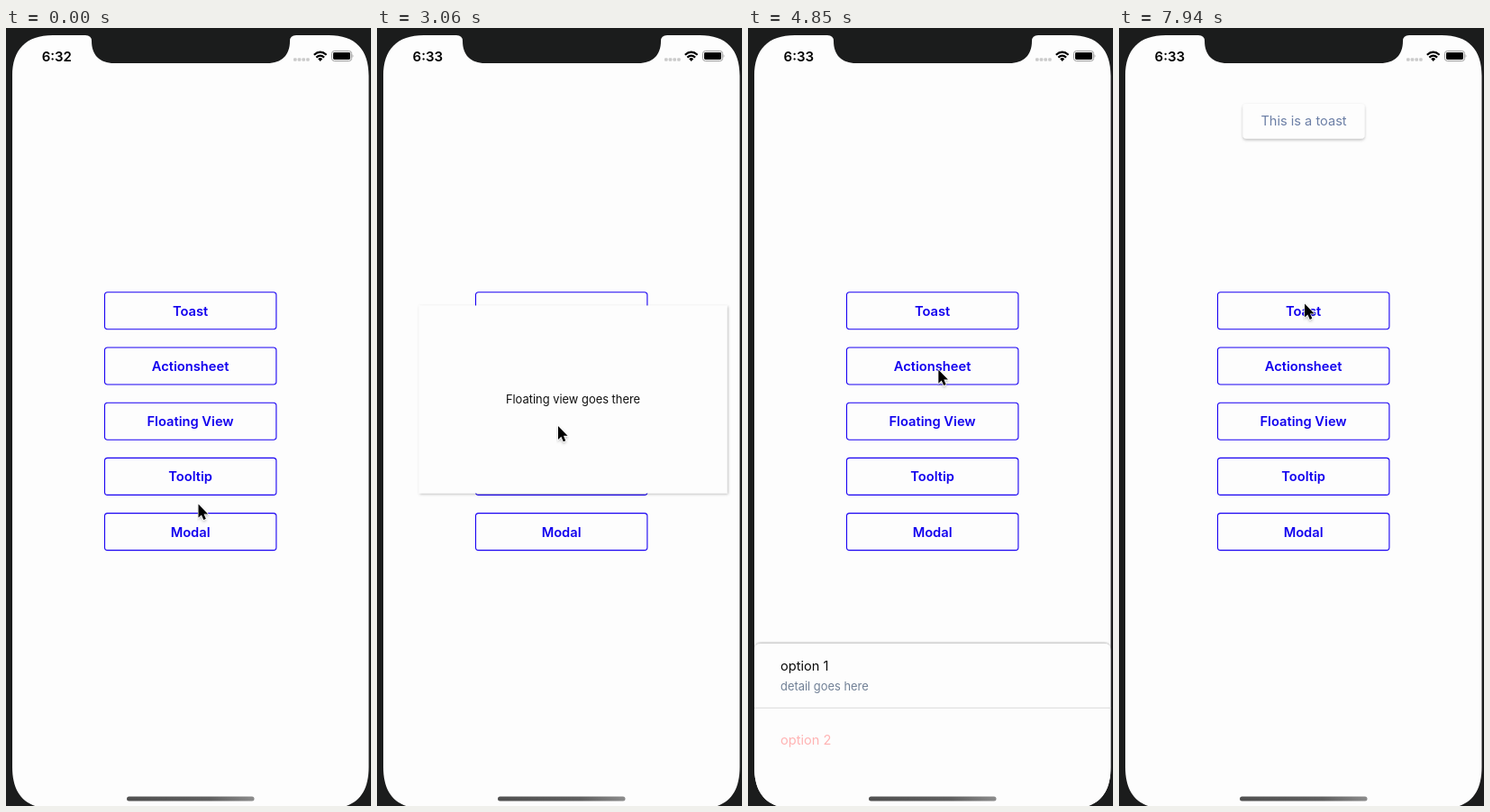
These frames come from a looping animation (405 by 862 pixels, 8 s). An HTML page:

```html
<!DOCTYPE html>
<html lang="en">
<head>
<meta charset="utf-8">
<title>Overlay demo</title>
<style>
  html, body { margin: 0; width: 100%; height: 100%; overflow: hidden; background: #1b1c1c; }
  svg { display: block; width: 100vw; height: 100vh; font-family: Inter, "Open Sans", sans-serif; }
  .btn rect { fill: none; stroke: #1800f2; stroke-width: 1.1; }
  .btn text { fill: #1200ee; font-size: 14.7px; font-weight: 600; }
  .mid { text-anchor: middle; }
  .small { font-size: 12.9px; }
  .body { font-size: 14.6px; }
</style>
</head>
<body>
<svg viewBox="0 0 405 862" xmlns="http://www.w3.org/2000/svg">
  <defs>
    <clipPath id="screen">
      <path id="shape" d="M52 8H88Q95 8 95 14.5C95 30 104 39 120 39H290C306 39 315 30 315 14.5Q315 8 322 8H358C388 8 402.5 24 402.5 53V819C402.5 849 388 865 358 865H52C22 865 7 849 7 819V53C7 24 22 8 52 8Z"/>
    </clipPath>
    <linearGradient id="bar">
      <stop offset="0" stop-color="#505050"/>
      <stop offset=".65" stop-color="#606060"/>
      <stop offset="1" stop-color="#8c8c8c"/>
    </linearGradient>
    <filter id="soft" x="-10%" y="-30%" width="120%" height="160%">
      <feDropShadow dx="0" dy="1.5" stdDeviation="1.5" flood-opacity=".28"/>
    </filter>
    <filter id="side" x="-5%" y="-5%" width="110%" height="110%">
      <feDropShadow dx="1" dy="1" stdDeviation="1.6" flood-opacity=".28"/>
    </filter>
    <filter id="lift" x="-5%" y="-10%" width="110%" height="120%">
      <feDropShadow dx="0" dy="-1" stdDeviation="1.2" flood-opacity=".28"/>
    </filter>
  </defs>

  <rect width="405" height="862" fill="#1b1c1c"/>
  <use href="#shape" fill="#fdfdfd"/>

  <g id="status">
    <text id="clock" class="mid" x="56.3" y="36.5" font-size="15" font-weight="600">6:32</text>
    <g id="dots" fill="#cbcbcb"></g>
    <g fill="none" stroke="#000" stroke-width="2.2">
      <path d="M341.8 29.8Q348.7 23.6 355.6 29.8"/>
      <path d="M344.3 32.6Q348.7 28.7 353.1 32.6"/>
    </g>
    <path d="M346.2 34.2Q348.7 32 351.2 34.2L348.7 36.9Z"/>
    <rect x="361.5" y="25.5" width="22" height="11" rx="2.8" fill="none" stroke="#999"/>
    <rect x="363" y="27" width="19" height="8" rx="1.4"/>
    <path d="M384.6 29Q386.4 31 384.6 33Z" fill="#999"/>
  </g>

  <g id="buttons"></g>

  <g id="tooltip" filter="url(#soft)">
    <path d="M193 532L206 520L219 532Z" fill="#0f00ff"/>
    <rect x="128.2" y="531" width="153.6" height="36" rx="4" fill="#0f00ff"/>
    <text class="mid small" x="205.2" y="553.8" fill="#f4f2ff">Tooltip text goes here</text>
  </g>

  <g id="floating">
    <rect x="46.5" y="307.5" width="342" height="208" fill="#fdfdfd" filter="url(#side)"/>
    <text class="mid small" x="217.5" y="416" fill="#111">Floating view goes there</text>
  </g>

  <g clip-path="url(#screen)">
    <g id="sheet">
      <path d="M7 900V680Q7 672.5 14.5 672.5H395Q402.5 672.5 402.5 680V900Z" fill="#fdfdfd" filter="url(#lift)"/>
      <text class="body" x="36" y="702.5" fill="#0a0a0a">option 1</text>
      <text class="small" x="36" y="725" fill="#718096">detail goes here</text>
      <path d="M7 744H402.5" stroke="#e0e0e0" stroke-width="1.3"/>
      <text class="body" x="36" y="785" fill="#ffb3b3">option 2</text>
    </g>
  </g>

  <g id="toast">
    <rect x="137.5" y="84" width="135" height="38.5" rx="4" fill="#fdfdfd" filter="url(#soft)"/>
    <text class="mid body" x="205" y="108.3" fill="#6c7fa6">This is a toast</text>
  </g>

  <rect x="134" y="851.5" width="141.5" height="5" rx="2.5" fill="url(#bar)"/>

  <path id="cursor" d="M0 0V15L3.4 11.9L5.8 17.4L8.3 16.3L6 10.9H10.6Z" fill="#000"
        stroke="#fff" stroke-width="1.2" paint-order="stroke" filter="url(#soft)"/>
</svg>

<script>
const LOOP = 8000;
const $ = id => document.getElementById(id);

$("buttons").innerHTML = ["Toast", "Actionsheet", "Floating View", "Tooltip", "Modal"].map((label, i) => {
  const y = 292.8 + 61.2 * i;
  return `<g class="btn"><rect x="109.5" y="${y}" width="190.4" height="41" rx="3.2"/>
    <text class="mid" x="204.6" y="${y + 26}">${label}</text></g>`;
}).join("");

$("dots").innerHTML = [0, 1, 2, 3].map(i =>
  `<rect x="${319 + 4.7 * i}" y="33.2" width="3.6" height="3.6" rx="1"/>`).join("");

// Pointer stops: time, x, y
const path = [
  [0, 213.5, 527.5], [40, 213.5, 527.5], [300, 202.5, 492.5], [1320, 202.5, 492.5],
  [1810, 200.8, 441.5], [3040, 200.8, 441.5], [3650, 249.5, 262.5], [3860, 249.5, 262.5],
  [4080, 223.5, 351.5], [4310, 210.5, 377], [4700, 210.5, 377], [4900, 211.5, 379],
  [5350, 211.5, 379], [5780, 133, 728.5], [6130, 63.5, 704], [6400, 63.5, 704],
  [6990, 235.5, 272.5], [7020, 235.5, 272.5], [7460, 206, 305.5], [LOOP, 206, 305.5]
];

const clamp = v => Math.max(0, Math.min(1, v));
const ramp = (t, a, b) => clamp((t - a) / (b - a));
const easeOut = p => 1 - (1 - p) ** 3;

function slope(i, k) {
  if (i <= 0 || i >= path.length - 1) return 0;
  const grad = j => (path[j + 1][k] - path[j][k]) / (path[j + 1][0] - path[j][0]);
  const a = grad(i - 1), b = grad(i);
  return a * b <= 0 ? 0 : 2 * a * b / (a + b);
}

// Monotone cubic through the pointer stops
function pointer(t, k) {
  let i = 0;
  while (i < path.length - 2 && t >= path[i + 1][0]) i++;
  const p = path[i], q = path[i + 1], d = q[0] - p[0], u = (t - p[0]) / d;
  const s = u * u * (3 - 2 * u);
  return p[k] + (q[k] - p[k]) * s
    + d * u * (1 - u) * ((1 - u) * slope(i, k) - u * slope(i + 1, k));
}

function fade(id, v) {
  $(id).setAttribute("opacity", v);
  $(id).style.display = v > 0 ? "" : "none";
}

function move(id, x, y) {
  $(id).setAttribute("transform", `translate(${x.toFixed(2)} ${y.toFixed(2)})`);
}

function draw(t) {
  $("clock").textContent = t < 1500 ? "6:32" : "6:33";
  fade("tooltip", ramp(t, 490, 700) * (1 - ramp(t, 1190, 1380)));
  fade("floating", ramp(t, 2000, 2210) * (1 - ramp(t, 3790, 3990)));
  fade("toast", ramp(t, 7830, 7935));

  const up = easeOut(ramp(t, 4660, 4960)) * (1 - ramp(t, 6150, 6420) ** 2);
  $("sheet").style.display = up > 0 ? "" : "none";
  move("sheet", 0, 196 * (1 - up));
  move("cursor", pointer(t, 1), pointer(t, 2));
}

const start = performance.now();
function tick() {
  draw((performance.now() - start) % LOOP);
  requestAnimationFrame(tick);
}
draw(0);
requestAnimationFrame(tick);
</script>
</body>
</html>
```
